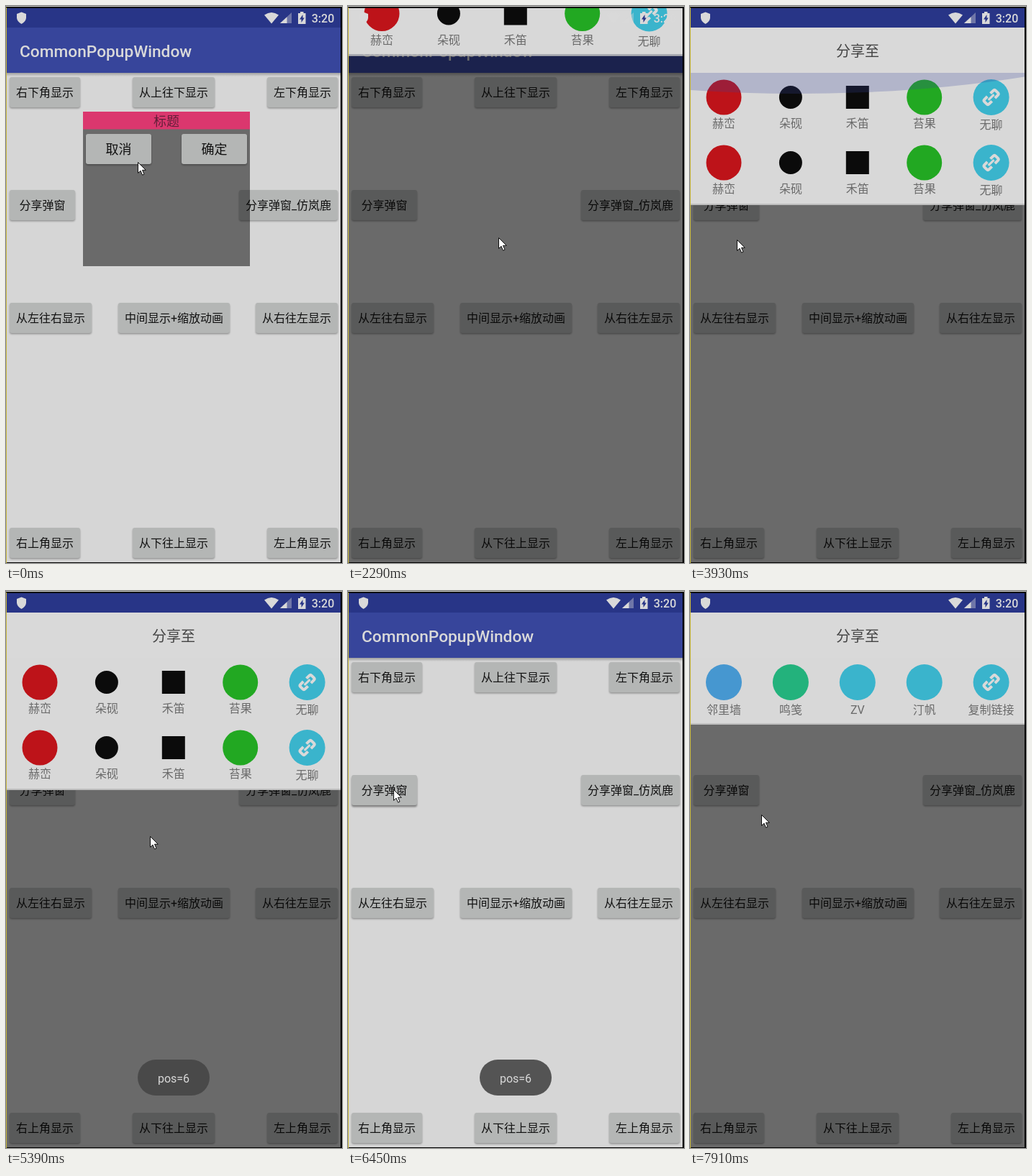
An HTML page that plays this animation: 467x775 px, repeating every 8 s.

```html
<!DOCTYPE html>
<html lang="zh-CN">
<head>
<meta charset="utf-8">
<title>CommonPopupWindow</title>
<style>
html, body { margin: 0; width: 100%; height: 100%; overflow: hidden; background: #000; }
svg { display: block; }
text { font-family: Roboto, "Noto Sans CJK SC", "Noto Sans CJK", sans-serif; font-size: 16px; fill: #111; text-anchor: middle; }
</style>
</head>
<body>
<svg width="467" height="775" viewBox="0 0 467 775">
  <defs>
    <clipPath id="screen"><rect x="1" y="3" width="464" height="771"/></clipPath>
    <linearGradient id="fade" x2="0" y2="1">
      <stop stop-opacity=".26"/><stop offset="1" stop-opacity="0"/>
    </linearGradient>
    <filter id="soft" x="-20%" y="-40%" width="140%" height="180%"><feGaussianBlur stdDeviation="1.1"/></filter>
    <g id="link" fill="none" stroke="#d9d9d9" stroke-width="4" transform="rotate(-45)">
      <path d="M-3 -4.5H-8.5Q-11 -4.5 -11 -2V2Q-11 4.5 -8.5 4.5H-3M3 -4.5H8.5Q11 -4.5 11 -2V2Q11 4.5 8.5 4.5H3"/>
      <path d="M-5.5 0H5.5" stroke-width="3"/>
    </g>
  </defs>
  <rect width="467" height="1" fill="#d4d4d0"/>
  <g clip-path="url(#screen)">
    <rect y="3" width="465" height="771" fill="#d6d6d6"/>
    <rect y="93" width="465" height="5" fill="url(#fade)"/>
    <rect y="30" width="465" height="63" fill="#37459b"/>
    <rect y="3" width="465" height="27" fill="#283587"/>
    <text x="19" y="70.5" style="font-size:22.7px;font-weight:500;fill:#d9d9d9;text-anchor:start">CommonPopupWindow</text>
    <g id="buttons"></g>
    <rect id="dim" y="3" width="465" height="771" opacity=".5"/>
    <g id="popup">
      <rect x="107" y="147" width="232" height="215" opacity=".5"/>
      <rect x="107" y="147" width="232" height="24.5" fill="#db376e"/>
      <text x="223" y="166.5" style="font-size:18px;fill:#64203a">标题</text>
    </g>
    <g id="brands"></g>
    <g id="share"></g>
    <g id="toast">
      <rect x="183" y="652" width="100" height="50" rx="25" fill="#464646" opacity=".9"/>
      <text x="233" y="683.5" style="fill:#d9d9d9">pos=6</text>
    </g>
    <g fill="#d9d9d9">
      <path d="M21.5 8.5L28 11V16.5Q27.5 22 21.5 25Q15.5 22 15 16.5V11Z"/>
      <path d="M359 12.5Q369 5.5 379 12.5L369 24.5Z"/>
      <path d="M397 9V24H381Z" opacity=".4"/>
      <path d="M390.5 15.2V24H381Z"/>
      <path d="M409 8H413.5V10H416.5V25H406V10H409Z"/>
      <path d="M412.5 12L408 18.5H410.5V23L414.8 16.5H412.5Z" fill="#283587"/>
      <text x="440.5" y="22.7" style="font-weight:500;fill:#d9d9d9">3:20</text>
    </g>
  </g>
  <rect y="2" width="1" height="773" fill="#c6b63e"/>
  <path id="cursor" d="M.5 .5V15.5L4 12.2L6.6 18.2L9 17.1L6.5 11.3H11.3Z" fill="#fff" stroke="#111"/>
</svg>
<script>
const $ = id => document.getElementById(id);

function add(parent, tag, attrs, label) {
  const el = document.createElementNS("http://www.w3.org/2000/svg", tag);
  for (const k in attrs) el.setAttribute(k, attrs[k]);
  if (label) el.textContent = label;
  parent.appendChild(el);
  return el;
}

function button(parent, x, y, right, label, size = 16) {
  const box = { x, y, width: right - x, height: 42, rx: 3 };
  const shadow = add(parent, "rect", { ...box, y: y + 1.5, opacity: .32, filter: "url(#soft)" });
  add(parent, "rect", { ...box, fill: "#b4b6b5" });
  add(parent, "text", { x: (x + right) / 2, y: y + 21 + size * .38, style: `font-size:${size}px` }, label);
  return shadow;
}

const base = $("buttons");
[[5, 99, 103, "右下角显示"], [176, 99, 290, "从上往下显示"], [363, 99, 461, "左下角显示"],
 [324, 256, 461, "分享弹窗_仿岚鹿"],
 [5, 413, 119, "从左往右显示"], [156, 413, 311, "中间显示+缩放动画"], [347, 413, 461, "从右往左显示"],
 [5, 726, 103, "右上角显示"], [176, 726, 290, "从下往上显示"], [363, 726, 461, "左上角显示"]
].forEach(b => button(base, ...b));
const pressShadow = button(base, 5, 256, 96, "分享弹窗");

button($("popup"), 111, 178, 202, "取消", 18);
button($("popup"), 244, 178, 335, "确定", 18);

// item: label, colour, shape size, shape kind, label offset
function sheet(g, bottom, items) {
  add(g, "rect", { width: 465, height: 30, fill: "#283587" });
  add(g, "rect", { y: 30, width: 465, height: 63, fill: "#d9d9d9" });
  add(g, "rect", { y: 93, width: 465, height: bottom - 93, fill: "#d8d8d8" });
  add(g, "rect", { y: bottom, width: 465, height: 2, fill: "#bebebe" });
  add(g, "text", { x: 233, y: 69.5, style: "font-size:20px;fill:#444" }, "分享至");
  items.forEach(([label, fill, r, kind, ly], i) => {
    const x = 47 + i % 5 * 92.9, y = 127 + Math.floor(i / 5) * 91;
    if (kind === "square") add(g, "rect", { x: x - r, y: y - r, width: 2 * r, height: 2 * r, fill });
    else add(g, "circle", { cx: x, cy: y, r, fill });
    if (kind === "link") add(g, "use", { href: "#link", x, y });
    add(g, "text", { x, y: y + ly, style: "fill:#6a6a6a" }, label);
  });
}

const cyan = "#3ab4cc";
const row = [["赫峦", "#bd1319", 24.5, "circle", 42.2], ["朵砚", "#0b0b0b", 16, "circle", 42.2],
  ["禾笛", "#0b0b0b", 16, "square", 42.2], ["苔果", "#22a822", 24.5, "circle", 42.2], ["无聊", cyan, 25, "link", 44]];
sheet($("brands"), 275, [...row, ...row]);
const glow = add($("brands"), "path", { fill: "#364599", opacity: .24 });
sheet($("share"), 184, [["邻里墙", "#4697d0", 25, "circle", 44], ["鸣笺", "#23b27c", 25, "circle", 44],
  ["ZV", cyan, 25, "circle", 44], ["汀帆", cyan, 25, "circle", 44], ["复制链接", cyan, 25, "link", 44]]);

// The screen refreshes in short bursts: first time, last time, count
const ticks = [[0, 120, 2], [390, 800, 4], [1190, 1190, 1], [1470, 2020, 4], [2290, 2290, 1], [2410, 2560, 2],
  [3000, 3930, 8], [4080, 4390, 3], [4670, 5390, 6], [5670, 6450, 7], [7120, 7910, 7]]
  .flatMap(([a, b, n]) => Array.from({ length: n }, (_, i) => n > 1 ? a + (b - a) * i / (n - 1) : a));

const path = [[0, 183, 217], [120, 173, 212], [390, 173, 212], [800, 83, 268], [1300, 83, 268], [1840, 190, 339],
  [2020, 209, 322], [2870, 209, 322], [3270, 76, 135], [3400, 70, 135], [3930, 65, 325], [4390, 134, 215],
  [4814, 134, 215], [5390, 200, 341], [5800, 200, 341], [6320, 63, 276], [7250, 63, 276], [7910, 99, 311], [8000, 99, 311]];

const ramp = (t, a, b) => Math.min(1, Math.max(0, (t - a) / (b - a)));
const ease = (t, start) => (1 - Math.cos(Math.PI * ramp(t, start, start + 300))) / 2;
const show = (el, on) => el.setAttribute("visibility", on ? "visible" : "hidden");
const shift = (el, x, y) => el.setAttribute("transform", `translate(${x} ${y})`);

function slide(el, height, open) {
  show(el, open > 0);
  shift(el, 0, -height * (1 - open));
}

// Overscroll glow: a flattened circle leaning towards the touch
function glowPath(pull) {
  const r = 697, cx = 149, s = .312 * pull;
  const y = x => 93 + s * (93 - r + Math.sqrt(r * r - (x - cx) ** 2));
  return `M0 93V${y(0)}A${r} ${r * s} 0 0 0 465 ${y(465)}V93Z`;
}

function draw(time) {
  const t = ticks.filter(k => k <= time + .01).pop();

  const i = Math.max(1, path.findIndex(p => p[0] >= t));
  const [a, b] = [path[i - 1], path[i]], k = ramp(t, a[0], b[0]);
  shift($("cursor"), Math.round(a[1] + (b[1] - a[1]) * k), Math.round(a[2] + (b[2] - a[2]) * k));

  const brandsOn = t >= 2290 && t < 5670, shareOn = t >= 7120;
  show($("dim"), brandsOn || shareOn);
  slide($("popup"), 362, 1 - ease(t, 340));
  slide($("brands"), 275, ease(t, 2191) - ease(t, 5600));
  slide($("share"), 185, ease(t, 7040));

  const raised = t >= 1190 && t < 2290 || t > 6449 && t < 7120;
  pressShadow.setAttribute("opacity", raised ? .4 : .32);
  shift(pressShadow, 0, raised ? 1 : 0);

  const pull = ramp(t, 3400, 3930) * (1 - ramp(t, 3930, 4390));
  show(glow, brandsOn && pull > 0);
  glow.setAttribute("d", glowPath(pull));

  $("toast").setAttribute("opacity", ramp(t, 4600, 4900) * (1 - ramp(t, 7150, 7500)));
}

const start = performance.now();
function loop() {
  draw((performance.now() - start) % 8000);
  requestAnimationFrame(loop);
}
loop();
</script>
</body>
</html>
```
